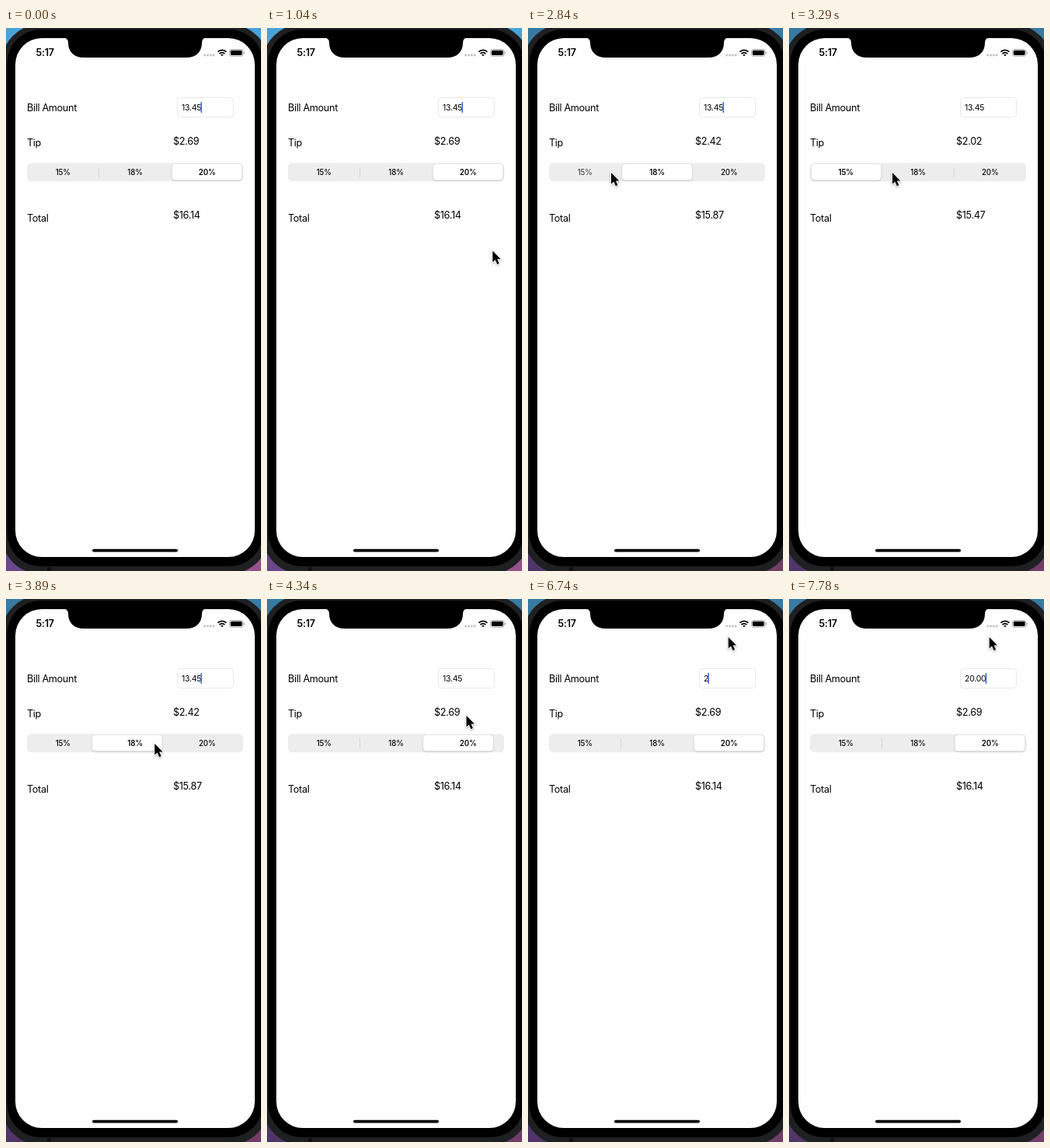
These frames come from a looping animation (328x698 px, 8 s). An HTML page:

```html
<!DOCTYPE html>
<html lang="en">
<head>
<meta charset="utf-8">
<title>Tip calculator</title>
<style>
html, body { margin: 0; width: 100%; height: 100%; overflow: hidden; background: #000; }
svg { display: block; width: 328px; height: 698px; }
text { font: 12.65px Inter, sans-serif; letter-spacing: -.32px; }
#clock { font-size: 12.5px; font-weight: 600; letter-spacing: -.2px; }
#amount { font-size: 10.4px; letter-spacing: -.2px; }
.seg { font-size: 9.67px; font-weight: 500; letter-spacing: -.1px; text-anchor: middle; }
#pill { filter: drop-shadow(0 1px 1px rgba(0, 0, 0, .18)); }
#cursor { filter: drop-shadow(0 1px 1px rgba(0, 0, 0, .3)); }
</style>
</head>
<body>
<svg viewBox="0 0 328 698">
  <defs>
    <linearGradient id="sky" x2="0" y2="1">
      <stop offset="0" stop-color="#4aa3d8"/><stop offset=".5" stop-color="#5a70b0"/><stop offset="1" stop-color="#6b4789"/>
    </linearGradient>
  </defs>

  <!-- desktop and phone body -->
  <rect width="328" height="698" fill="url(#sky)"/>
  <rect x="164" y="600" width="164" height="98" fill="#98528a"/>
  <rect id="shade" width="328" height="698" opacity=".25"/>
  <rect x="-6" y="-5" width="344" height="707" rx="51" fill="#1f2022"/>
  <rect x="1.5" y="2" width="329" height="690" rx="43"/>
  <rect x="53" y="693" width="5" height="5" fill="#111"/>
  <rect x="12" y="13" width="308" height="667" rx="34" fill="#fefefe"/>
  <path d="M74 12.5q6 .5 6 6.5c0 12 8 19 20 19H232c12 0 20-7 20-19q0-6 6-6.5z"/>
  <rect x="111" y="669.7" width="110" height="3.8" rx="1.9"/>

  <!-- status bar -->
  <text id="clock" x="38.5" y="36.3">5:17</text>
  <g fill="#bdbdbd">
    <circle cx="255.6" cy="35" r="1.4"/><circle cx="259.5" cy="35" r="1.4"/>
    <circle cx="263.3" cy="35" r="1.4"/><circle cx="267.1" cy="35" r="1.4"/>
  </g>
  <g fill="none" stroke="#000" stroke-width="1.8">
    <path d="M272.4 30.6a7.8 7.8 0 0 1 11 0M274.5 33a4.8 4.8 0 0 1 6.8 0"/>
    <path d="M276.2 34.4L277.9 36.3L279.6 34.4Q277.9 33.2 276.2 34.4z" fill="#000" stroke="none"/>
    <rect x="287.5" y="27.5" width="17.4" height="8.8" rx="2.4" stroke="#999" stroke-width=".8"/>
  </g>
  <rect x="288.8" y="28.8" width="14.8" height="6.2" rx="1.4"/>
  <rect x="305.7" y="30.5" width="1.1" height="2.8" rx=".5" fill="#999"/>

  <!-- form -->
  <text x="27" y="106.8">Bill Amount</text>
  <rect x="220.5" y="89.5" width="72" height="25" rx="4" fill="#fff" stroke="#e6e6e6" stroke-width=".9"/>
  <text id="amount" x="226" y="105.8"></text>
  <rect id="caret" y="95" width="1.7" height="14" rx=".8" fill="#3f6bdc"/>
  <text x="27" y="151.5">Tip</text>
  <text id="tip" x="215" y="149.5"></text>
  <rect x="27" y="173.5" width="278" height="23.5" rx="5.5" fill="#ededee"/>
  <path class="split" d="M119.5 179v13" stroke="#d6d6d8"/>
  <path class="split" d="M212.3 179v13" stroke="#d6d6d8"/>
  <rect id="pill" y="175" width="90" height="20.6" rx="4.5" fill="#fff" stroke="rgba(0,0,0,.05)" stroke-width=".6"/>
  <text class="seg" x="73.2" y="188.6">15%</text>
  <text class="seg" x="166" y="188.6">18%</text>
  <text class="seg" x="258.7" y="188.6">20%</text>
  <text x="27" y="248.7">Total</text>
  <text id="total" x="215" y="245"></text>

  <path id="cursor" d="M0 0V14.6L3.3 11.5L5.9 17.2L8.4 16.1L5.9 10.6H10.3Z" stroke="#fff" stroke-width="1.8" paint-order="stroke"/>
</svg>
<script>
const $ = id => document.getElementById(id);
const segs = [...document.querySelectorAll('.seg')];
const splits = [...document.querySelectorAll('.split')];

const LOOP = 8000, BILL = 13.45, RATES = [.15, .18, .2];
// [press time, release time, segment]
const taps = [[-900, -800, 2], [1700, 1910, 1], [2800, 2960, 0], [3600, 3690, 1], [4000, 4150, 2]];
// [time, field content]
const edits = [[-375, '13.45'], [5390, '13.4'], [5690, '13.'], [5840, '13'], [5990, '1'], [6140, ''],
  [6740, '2'], [6880, '20'], [7330, '20.'], [7630, '20.0'], [7780, '20.00']];
// [time, x, y]
const route = [[840, 330, 320], [1640, 171, 186], [2240, 171, 186], [2690, 107, 186], [3140, 107, 186],
  [3290, 133, 186], [3800, 165, 186], [4040, 235, 186], [4190, 245, 184], [4340, 256.5, 150], [4640, 257.7, 49]];

const clamp = v => Math.min(1, Math.max(0, v));
const lerp = (a, b, u) => a + (b - a) * u;
const lastAt = (list, t, col = 0) => list.findLastIndex(e => e[col] <= t);

// The screen refreshes every 150 ms, counted anew from each of these moments.
function tick(t) {
  const start = [0, 740, 6880].findLast(s => s <= t);
  return start + Math.floor((t - start) / 150) * 150;
}

function drawField(t) {
  const [since, value] = edits[lastAt(edits, t)];
  $('amount').textContent = value;
  const width = value ? $('amount').getComputedTextLength() : 0;
  $('caret').setAttribute('x', 225.1 + width);
  // Solid after typing, then blinking once a second.
  const phase = since < 0 ? (t + 625) % 1000 : 500;
  const alpha = phase < 500 ? clamp((phase - 50) / 170) : clamp((850 - phase) / 170);
  $('caret').setAttribute('opacity', alpha);
}

function drawSegments(t) {
  const n = lastAt(taps, t, 1);
  const [, released, chosen] = taps[n];
  const from = n ? taps[n - 1][2] : chosen;
  const u = 1 - (1 - clamp((t - released) / 300)) ** 2;
  $('pill').setAttribute('x', 28.5 + 92.5 * lerp(from, chosen, u));

  const held = taps.find(([down, up]) => t >= down && t < up);
  segs.forEach((seg, i) => {
    seg.style.fontWeight = i === chosen ? 600 : 500;
    seg.setAttribute('opacity', held && held[2] === i ? .7 : 1);
  });
  splits.forEach((line, i) => line.setAttribute('opacity', chosen === i || chosen === i + 1 ? 0 : 1));

  const tip = BILL * RATES[chosen];
  $('tip').textContent = '$' + tip.toFixed(2);
  $('total').textContent = '$' + (BILL + tip).toFixed(2);
}

function drawCursor(t) {
  const i = lastAt(route, t);
  $('cursor').setAttribute('visibility', i < 0 ? 'hidden' : 'visible');
  if (i < 0) return;
  const a = route[i], b = route[i + 1] || a;
  const u = clamp((t - a[0]) / (b[0] - a[0] || 1));
  $('cursor').setAttribute('transform', `translate(${lerp(a[1], b[1], u)} ${lerp(a[2], b[2], u)})`);
}

function frame() {
  const t = tick(performance.now() % LOOP);
  $('shade').setAttribute('visibility', t < 1700 ? 'hidden' : 'visible');
  drawField(t);
  drawSegments(t);
  drawCursor(t);
  requestAnimationFrame(frame);
}
frame();
</script>
</body>
</html>
```
